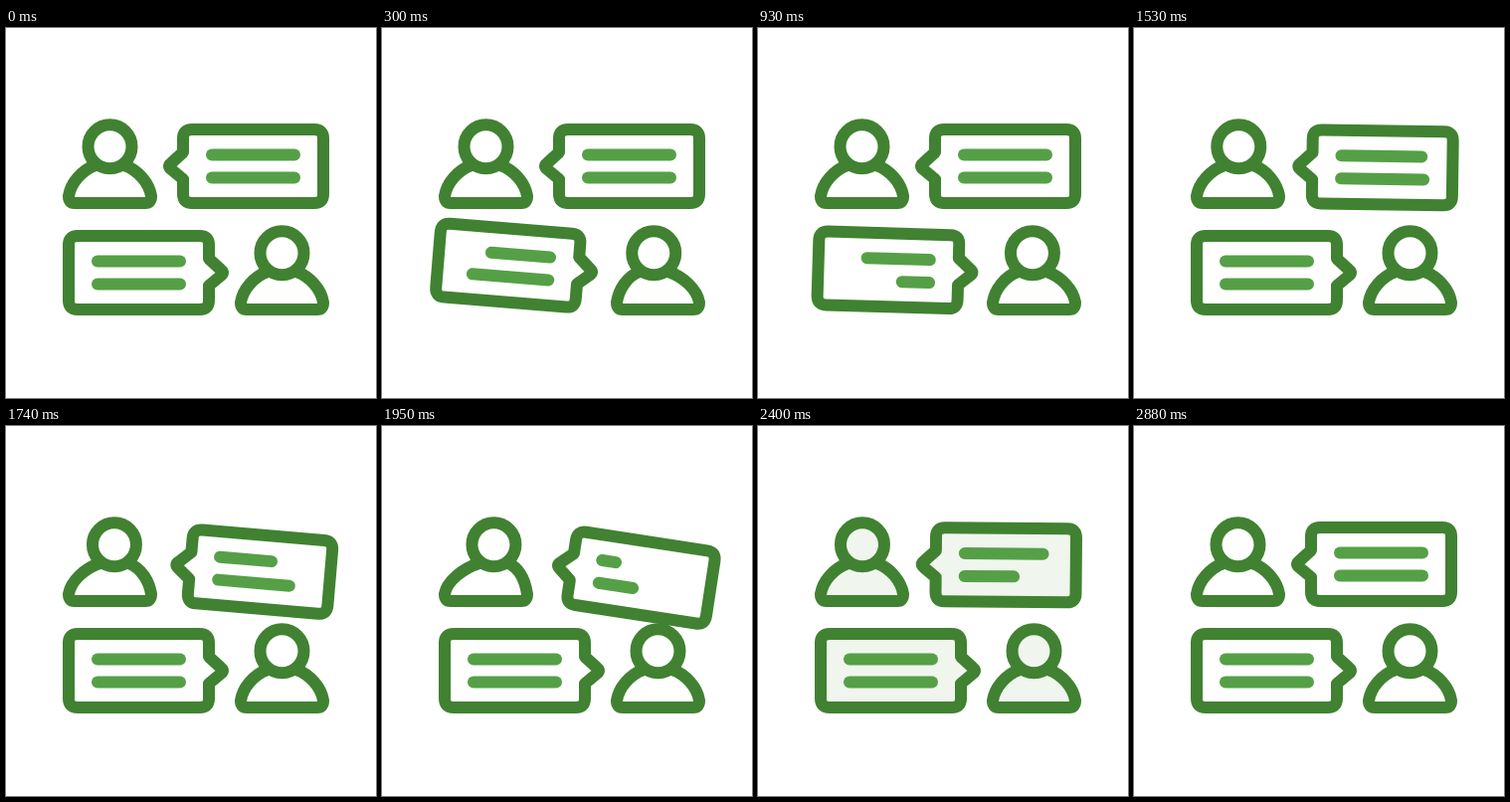
These frames come from a looping animation (372 px wide and 372 px high, 3.03 s). An HTML page:

```html
<!DOCTYPE html>
<html lang="en">
<head>
<meta charset="utf-8">
<title>Chat</title>
<style>
  html, body { margin: 0; width: 100%; height: 100%; overflow: hidden; background: #fff; }
  svg { display: block; width: 100vw; height: 100vh; }
  .outline { stroke: #408231; stroke-width: 12; stroke-linejoin: round; stroke-linecap: round; }
  .line { stroke: #55a046; stroke-width: 12; stroke-linecap: round; }
</style>
</head>
<body>
<svg viewBox="0 0 372 372">
  <g id="top"></g>
  <g id="bottom" transform="translate(382 107) scale(-1 1)"></g>
</svg>
<script>
const LOOP = 3030, STEP = 30, LAST = 2880;
const BUBBLE = 'M187 102H310Q319 102 319 111V167Q319 176 310 176H187Q178 176 178 167V152' +
  'L166 142Q162 139 166 136L178 125V111Q178 102 187 102Z';
const LINE_X = 207, LINE_LENGTH = 83, LINE_YS = [127.5, 150.5];
const LINE_DELAY = 120;

const clamp = x => Math.min(1, Math.max(0, x));
const progress = (t, from, to) => clamp((t - from) / (to - from));
const inOut = u => (1 - Math.cos(Math.PI * u)) / 2;
const out = u => Math.sin(Math.PI * u / 2);

function add(parent, tag, attrs) {
  const node = document.createElementNS('http://www.w3.org/2000/svg', tag);
  for (const name in attrs) node.setAttribute(name, attrs[name]);
  return parent.appendChild(node);
}

function createSpeaker(id, start, peak, end, turn) {
  const root = document.getElementById(id);
  const body = add(root, 'path', { class: 'outline' });
  const head = add(root, 'circle', { class: 'outline', cy: 119.2, r: 22 });
  const bubble = add(root, 'g', {});
  add(bubble, 'path', { class: 'outline', d: BUBBLE });
  const lines = LINE_YS.map(() => add(bubble, 'path', { class: 'line' }));
  return { root, body, head, bubble, lines, start, peak, end, turn };
}

// The bottom speaker is mirrored, so its turn is negative.
const speakers = [
  createSpeaker('top', 1400, 2060, 2460, 9.3),
  createSpeaker('bottom', 0, 600, 1060, -9.3)
];

function bodyPath(dx) {
  return `M${90 + dx} 138C${76 + dx * .7} 143 65 156 63 169Q63 176 69 176H140` +
    `Q146 176 146 169C144 156 ${133 + dx * .7} 143 ${119 + dx} 138`;
}

// Shrinks away, grows past full length, then settles.
function lineScale(t) {
  if (t < 730) return 1 - inOut(progress(t, 60, 730));
  if (t < 1150) return 1.12 * out(progress(t, 730, 1150));
  return 1.12 - .12 * inOut(progress(t, 1150, 1360));
}

function drawSpeaker(s, t) {
  const lean = t < s.peak
    ? inOut(progress(t, s.start, s.peak))
    : 1 - inOut(progress(t, s.peak, s.end));
  const dx = 8.5 * lean;
  s.head.setAttribute('cx', 104.5 + dx);
  s.body.setAttribute('d', bodyPath(dx));
  s.bubble.setAttribute('transform',
    `translate(${14 * lean} 0) rotate(${s.turn * lean * Math.sign(s.turn)} 158 139)`);
  s.lines.forEach((line, i) => {
    const scale = lineScale(t - s.start - i * LINE_DELAY);
    line.setAttribute('d', `M${LINE_X} ${LINE_YS[i]}h${LINE_LENGTH * scale}`);
    line.setAttribute('visibility', scale > .005 ? 'visible' : 'hidden');
  });
  if (s.turn < 0) {
    s.bubble.setAttribute('transform',
      `translate(${14 * lean} 0) rotate(${s.turn * lean} 158 139)`);
  }
  s.root.setAttribute('fill', t >= 2370 && t < 2460 ? '#f0f5ee' : '#fff');
}

function render(now) {
  const t = Math.min(LAST, Math.floor((now % LOOP) / STEP) * STEP);
  speakers.forEach(s => drawSpeaker(s, t));
}

const origin = performance.now();
function tick() {
  render(performance.now() - origin);
  requestAnimationFrame(tick);
}
tick();
</script>
</body>
</html>
```
